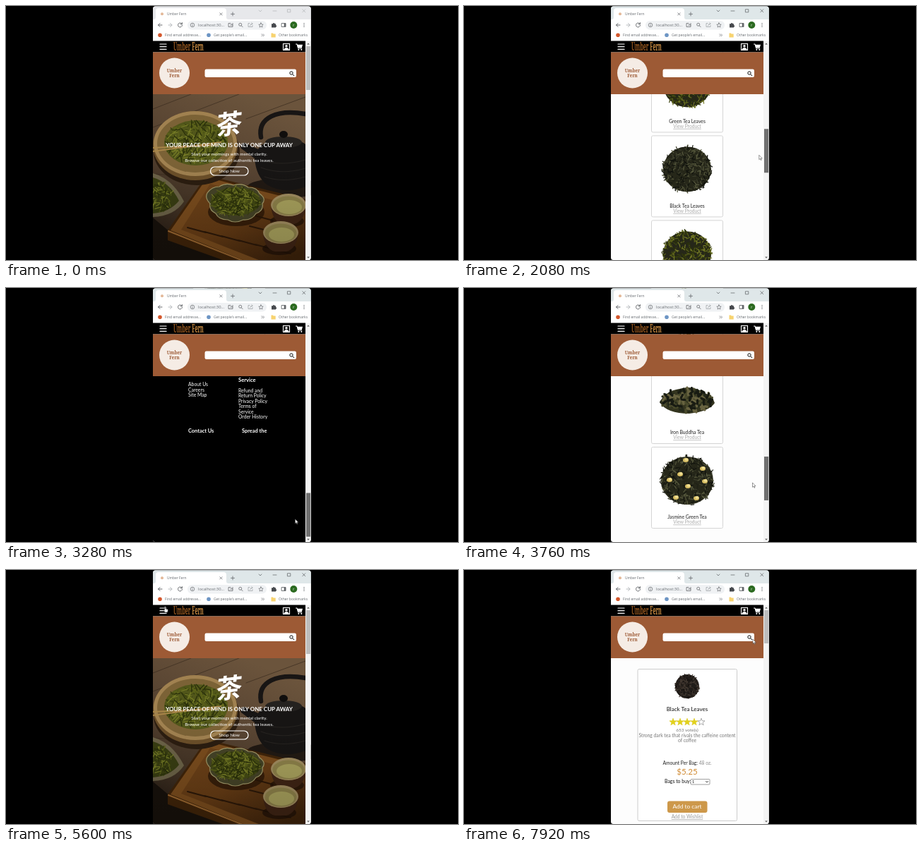
These frames come from a looping animation (640 px wide and 360 px high, 8000 ms). An HTML page:

```html
<!DOCTYPE html>
<html lang="en">
<head>
<meta charset="utf-8">
<title>Tea shop</title>
<style>
html, body { margin: 0; width: 100%; height: 100%; overflow: hidden; background: #000; }
svg { display: block; width: 100vw; height: 100vh; }
text { font-family: Lato, "Open Sans", sans-serif; }
.ui { font-family: "Open Sans", "Noto Sans", sans-serif; fill: #666b70; }
.serif { font-family: "Noto Serif", "Liberation Serif", serif; font-weight: 700; }
.cjk { font-family: "Noto Sans CJK SC", "Noto Sans CJK JP", "Noto Sans CJK", sans-serif; font-weight: 900; }
.line { fill: none; stroke-linecap: round; stroke-linejoin: round; }
</style>
</head>
<body>
<svg id="stage" viewBox="0 0 640 360" xmlns="http://www.w3.org/2000/svg"></svg>
<script>
const LOOP = 8000, STEP = 80;
const SHOP = ['Umber', 'Fern'];

let seed = 11;
const random = () => (seed = seed * 16807 % 2147483647) / 2147483647;

const rect = (x, y, w, h, fill, more = '') =>
  `<rect x="${x}" y="${y}" width="${w}" height="${h}" fill="${fill}" ${more}/>`;
const ellipse = (x, y, rx, ry, fill, more = '') =>
  `<ellipse cx="${x}" cy="${y}" rx="${rx}" ry="${ry}" fill="${fill}" ${more}/>`;
const shape = (d, fill, more = '') => `<path d="${d}" fill="${fill}" ${more}/>`;
const line = (d, color, width = 1, more = '') =>
  `<path class="line" d="${d}" stroke="${color}" stroke-width="${width}" ${more}/>`;
// y is the middle of the lower-case letters
const text = (x, y, size, fill, words, more = '') =>
  `<text x="${x}" y="${(y + size * .29).toFixed(2)}" font-size="${size}" fill="${fill}" ${more}>${words}</text>`;
const centred = (y, size, fill, words, more = '') =>
  text(316, y, size, fill, words, `text-anchor="middle" ${more}`);
const underlined = 'text-decoration="underline"';

// Loose tea: short strokes scattered inside an ellipse
function leaves(cx, cy, rx, ry, count, colors, length = 5, width = 1.2) {
  const paths = colors.map(() => '');
  for (let i = 0; i < count; i++) {
    const a = random() * 2 * Math.PI, r = Math.sqrt(random()), turn = random() * Math.PI;
    const x = cx + rx * r * Math.cos(a), y = cy + ry * r * Math.sin(a);
    const dx = Math.cos(turn) * length, dy = Math.sin(turn) * length;
    paths[i % colors.length] += `M${(x - dx / 2).toFixed(1)} ${(y - dy / 2).toFixed(1)}l${dx.toFixed(1)} ${dy.toFixed(1)}`;
  }
  return paths.map((d, i) => line(d, colors[i], width)).join('');
}

const greens = ['#3a410f', '#5c6319', '#757b26', '#2a300a'];

function cup(x, y) {
  return ellipse(x - 2, y + 20, 24, 9, '#1d0f06', 'opacity=".7"') +
    shape(`M${x - 25} ${y - 3}q2 24 17 27h16q15-4 17-27z`, '#3f2414') +
    ellipse(x, y - 3, 25, 16, '#a08c5f') + ellipse(x, y - 2, 22.5, 13.5, '#8c8049') +
    ellipse(x + 1, y, 18, 10, '#a7a05c');
}

function hero() {
  let slots = '';
  for (let i = 0; i < 6; i++) slots += `M${257 + i * 24} ${314 + i * 6}l26 7`;
  const planks = 'M208 146L262 125M208 172L330 125M340 160L424 129M208 238L240 240';
  return rect(208, 125, 216, 239, 'url(#wood)') + line(planks, '#3a2b1f', 1, 'opacity=".7"') +
    ellipse(395, 258, 55, 14, '#15100c', 'opacity=".8"') +
    // bamboo tray
    shape('M208 300L232 320L320 364H208Z', '#17110b') +
    shape('M284 240L424 274V364H318L229 332V318Z', '#402409') +
    shape('M285 243L424 278V364H346L233 318Z', '#7a4c1d') +
    shape('M289 252L424 287V364H368L248 317Z', 'url(#bamboo)') +
    line('M230 319L343 364', '#9b6730', 2) + line(slots, '#2c1808', 2) +
    line('M352 297l26 7M345 312l20 5', '#2c1808', 2) +
    // teapot
    line('M361 186C356 158 384 146 424 153', '#181514', 6.5) +
    shape('M352 216L333 202Q330 196 338 194L357 203Q366 189 394 188Q416 189 424 196V256Q394 268 369 253Q354 241 352 216Z', '#171514') +
    ellipse(393, 193, 26, 8, '#25221f') + ellipse(393, 182, 6, 5, '#100e0d') +
    line('M360 218Q390 228 424 218M361 229Q390 240 424 230M366 242Q392 251 424 242', '#262320', 1.2) +
    // bamboo bowl
    ellipse(270, 206, 61, 48, '#2b1d10') + ellipse(268, 198, 60, 49, '#6b4f29') +
    ellipse(268, 195, 59, 46, '#a08150') + ellipse(268, 195, 54, 41, '#7b6236') +
    ellipse(269, 194, 45, 32, '#51561a') + leaves(269, 194, 42, 29, 260, greens, 9, 1.3) +
    line('M208 206L304 193M208 201L300 197', '#a78548', 2.2) +
    // glass jar
    shape('M208 237Q236 245 252 277Q238 298 208 299Z', '#6b6247') +
    shape('M208 243Q232 250 245 276Q232 292 208 294Z', '#383d12') +
    leaves(219, 270, 16, 20, 80, greens, 8, 1.2) +
    // scalloped dish
    ellipse(326, 292, 40, 20, '#271506', 'opacity=".75"') +
    shape('M285 265q6-9 17-9q9-6 20-2q12-4 21 3q13 0 16 9q10 7 4 14q2 10-9 14q-6 10-18 9q-12 6-22 0q-13 0-17-9q-10-5-8-14q-8-8-4-15z', '#454327', 'stroke="#a09868" stroke-width="1.2"') +
    ellipse(325, 277, 35, 20, '#444a14') + leaves(325, 277, 34, 19, 220, greens, 9, 1.2) +
    cup(400, 285) + cup(389, 324) +
    rect(208, 125, 216, 239, 'url(#shade)') +
    `<g transform="translate(316 167) rotate(-7) skewX(-12)">${text(0, 3, 37, '#fff', '茶', 'class="cjk" text-anchor="middle"')}</g>` +
    centred(197.5, 8, '#fff', 'YOUR PEACE OF MIND IS ONLY ONE CUP AWAY', 'font-weight="700"') +
    centred(210, 6.25, '#fff', 'Start your mornings with mental clarity.') +
    centred(219.5, 6.3, '#fff', 'Browse our collection of authentic tea leaves.') +
    rect(289.5, 228, 53.5, 12, 'none', 'rx="6" stroke="#fff" stroke-width="1.2"') +
    centred(234, 6.5, '#fff', 'Shop Now');
}

const potIcon = line('M311 0q-3 3 0 5t0 5M317 0q-3 3 0 5t0 5M323 0q-3 3 0 5t0 5', '#000', 1.7) +
  line('M305 13h22v4h-22zM307 17q-5 6-4 11l2 6h22l2-6q1-5-4-11', '#000', 1.9) +
  line('M310 33v-4a6 6 0 0 1 12 0v4M316 26q-5 5 0 7q5-2 0-7', '#000', 1.5);
const cupIcon = line('M311 2v6M316 0v8M321 2v6', '#000', 1.6) +
  line('M304 11h24v6q0 10-8 10h-8q-8 0-8-10zM328 13h2q3 4-3 9M301 30h30', '#000', 1.8) +
  line('M317 11v5M314 18l3-2l3 2v5h-6z', '#000', 1.3);

function feature(y, icon, label, note) {
  return `<g transform="translate(0 ${y})">${icon}</g>` +
    centred(y + 39, 6.5, '#111', label) + centred(y + 46, 6.8, '#aaa', note);
}

const blossom = (x, y) => ellipse(x, y, 4, 3, '#d7bd63') + ellipse(x + 1, y - 1, 2.4, 2, '#eedd91');
const darkTea = ['#1f2016', '#3b3d2b', '#56583c', '#11130d'];
const roundTea = (y, rx, ry, colors = darkTea) =>
  ellipse(316, y, rx - 2, ry - 2, '#262719') + leaves(316, y, rx - 1, ry - 1, 330, colors, 4.5, 1.2);

function jasmine(y) {
  const spots = [[314, -29], [306, -9], [338, -17], [291, -1], [341, 1], [317, 8], [329, 25], [300, 24]];
  return roundTea(y, 39, 36) + spots.map(([x, dy]) => blossom(x, y + dy)).join('');
}
function ironBuddha(y) {
  return shape(`M277 ${y + 5}q8-16 28-19q18-6 34 5q14 5 16 15q-8 12-36 15q-32 0-42-16z`, '#34351f') +
    leaves(316, y + 2, 36, 16, 150, ['#24291a', '#494a2b', '#686340', '#181b12'], 5, 3.2);
}

function card(y, name, picture) {
  return rect(265.5, y + .5, 101, 115, '#fff', 'rx="2" stroke="#d5d5d5" stroke-width="1"') + picture +
    centred(y + 100.5, 6.8, '#222', name) + centred(y + 107.5, 6.7, '#aaa', 'View Product', underlined);
}

const column = (x, y, rows) =>
  rows.map((row, i) => text(x, y + i * 7.45, 6.8, '#fff', row)).join('');

function homePage() {
  const intro = ['All of our tea leaves are hand-picked in good shape, whole,',
    'and without any tear. We avoid the use of any industrial',
    'machines to pick the leaves in order to maintain excellent', 'quality.'];
  const bold = 'font-weight="700"';
  return hero() +
    centred(389.5, 10.3, '#111', 'Our meticulous standards go a long way') +
    intro.map((row, i) => centred(405 + i * 7.4, 6.85, '#888', row)).join('') +
    feature(450, potIcon, 'Aromatic', 'Experience fragrant smells') +
    feature(522, cupIcon, 'Great Taste', 'Experience fine flavors') +
    card(641, 'Green Tea Leaves', roundTea(689, 36, 34, greens)) +
    card(761, 'Black Tea Leaves', roundTea(809, 36, 34)) +
    card(881, 'Green Tea', roundTea(929, 36, 34, greens)) +
    card(1001, 'Iron Buddha Tea', ironBuddha(1053)) +
    card(1121, 'Jasmine Green Tea', jasmine(1169)) +
    rect(208, 1260, 216, 260, '#000') +
    text(258, 1272, 7.4, '#fff', 'Information', bold) +
    column(258, 1287.5, ['About Us', 'Careers', 'Site Map']) +
    text(329, 1272, 7.6, '#fff', 'Customer', bold) + text(329, 1281, 7.6, '#fff', 'Service', bold) +
    column(329, 1296, ['Refund and', 'Return Policy', 'Privacy Policy', 'Terms of', 'Service', 'Order History']) +
    text(258, 1352.5, 7.4, '#fff', 'Contact Us', bold) +
    text(334, 1352.5, 7.4, '#fff', 'Spread the', bold);
}

function star(x, filled) {
  let d = '';
  for (let i = 0; i < 10; i++) {
    const r = i % 2 ? 2.2 : 5.3, a = i * Math.PI / 5;
    d += `${i ? 'L' : 'M'}${(x + r * Math.sin(a)).toFixed(2)} ${(215.5 - r * Math.cos(a)).toFixed(2)}`;
  }
  return shape(d + 'Z', filled ? '#e3d21b' : '#fff', `stroke="${filled ? '#d8c716' : '#777'}" stroke-width=".6"`);
}

function productPage() {
  return rect(246, 140.5, 140.5, 215, '#fff', 'rx="2" stroke="#ccc"') +
    ellipse(316, 165, 17, 17, '#211d1a') + leaves(316, 165, 17, 17, 150, ['#17120f', '#302822', '#443a32'], 3, 1.2) +
    centred(198, 8.05, '#111', 'Black Tea Leaves') +
    [296, 306, 316, 326, 336].map(x => star(x, x < 330)).join('') +
    centred(227.5, 6.5, '#777', '653 vote(s)') +
    centred(235, 6.75, '#777', 'Strong dark tea that rivals the caffeine content') +
    centred(242, 6.75, '#777', 'of coffee') +
    centred(274, 6.7, '#222', 'Amount Per Bag: <tspan fill="#888">48 oz.</tspan>') +
    centred(287, 11.6, '#d08a32', '$5.25') +
    text(284, 300, 6.9, '#111', 'Bags to buy:') +
    rect(321, 296.5, 27, 7.5, '#fff', 'rx="1" stroke="#777" stroke-width=".7"') +
    text(323, 300.3, 5.5, '#111', '1') + line('M342.5 299.5l1.5 1.5l1.5-1.5', '#111', .8) +
    rect(288, 327.5, 56.5, 16.5, '#cd984a', 'rx="3"') +
    centred(336, 8.3, '#fff', 'Add to cart') +
    centred(350.3, 6.65, '#999', 'Add to Wishlist', underlined);
}

const magnifier = (x, y, r, color, width) =>
  `<circle cx="${x}" cy="${y}" r="${r}" fill="none" stroke="${color}" stroke-width="${width}"/>` +
  line(`M${x + r * .75} ${y + r * .75}l${r} ${r}`, color, width);

function browserBar() {
  const ink = '#66696d';
  return rect(208, 0, 224, 19, '#dfe6ea', 'id="titlebar"') +
    shape('M209 19q3 0 3-3V7q0-4 4-4h92q4 0 4 4v9q0 3 3 3z', '#fff') +
    ellipse(221, 11.3, 2, 2, '#e3b898') + text(228, 11.6, 4.9, '', SHOP.join(' '), 'class="ui"') +
    line('M302.8 9.8l3.2 3.2m0-3.2l-3.2 3.2M318.5 11.4h5m-2.5-2.5v5', ink, .8) +
    `<g id="controls">${line('M358 6l2 2l2-2M378 7h5M419.8 4.8l4 4m0-4l-4 4M398.8 4.8h4v4h-4z', 'currentColor', .7)}</g>` +
    rect(208, 19, 224, 31, '#fff') + rect(257, 21, 112, 12.5, '#f0f2f4', 'rx="6.2"') +
    line('M221 27h-5.5m2.5-2.5l-2.5 2.5l2.5 2.5', ink) +
    line('M230 27h5m-2.5-2.5l2.5 2.5l-2.5 2.5', '#b8bbbe') +
    line('M249 25.3a3 3 0 1 0 .5 2M249.4 23.6v2.2h-2.2', ink) +
    line('M264 26.7v1.8M264 25v.1', ink, .7) + `<circle cx="264" cy="27" r="2.8" fill="none" stroke="${ink}" stroke-width=".7"/>` +
    text(272, 27.2, 5.8, '', 'localhost:30...', 'class="ui"') +
    line('M318 24.5h-3v5h6v-2M317.5 27h3m-1.2-1.4l1.4 1.4M321 24.5v2', ink, .8) +
    magnifier(331.7, 26.3, 2, ink, .8) +
    line('M345 24.5h-2v5h6v-2M345.5 28q0-3 3.5-3m-1.3-1.3l1.5 1.3l-1.5 1.4', '#a3a7aa', .8) +
    line('M361 23.9l1 2.1l2.2.3l-1.7 1.5l.5 2.3l-2-1.2l-2 1.2l.5-2.3l-1.7-1.5l2.2-.3z', ink, .7) +
    shape('M376 25.2h2a1.2 1.2 0 0 1 2.4 0h1.6v2a1.2 1.2 0 0 1 0 2.4v.9h-6z', '#46494d') +
    line('M390.5 24.5h5.5v5h-5.5z', ink, .9) + rect(393.6, 24.5, 2.5, 5, ink) +
    ellipse(407.3, 27, 5, 5, '#2b6a20') + text(407.3, 27, 5.5, '#dfe8dc', 'r', 'text-anchor="middle"') +
    [24.7, 27, 29.3].map(y => ellipse(422, y, .7, .7, ink)).join('') +
    ellipse(218, 41.2, 2.8, 2.8, '#d4582d') + text(225, 41.3, 5.05, '', 'Find email addresse...', 'class="ui"') +
    ellipse(287, 41.2, 2.8, 2.8, '#6d95c4') + text(294, 41.3, 5.05, '', 'Get people’s email...', 'class="ui"') +
    line('M362 39.8l1.3 1.5l-1.3 1.5m2.2-3l1.3 1.5l-1.3 1.5', ink, .7) +
    shape('M375.5 38.4h2.4l.8 1h3v5.2h-6.2z', '#f7d36f') + text(386, 41.3, 5, '', 'Other bookmarks', 'class="ui"');
}

function siteHeader() {
  const badge = SHOP.map((word, i) => text(238.5, 92 + i * 7, 6.2, '#9d5a35', word, 'class="serif" text-anchor="middle"')).join('');
  return rect(208, 49.5, 216, 16, '#000') +
    line('M218 54h9M218 57.7h9M218 61.4h9', '#fff', 1.2) +
    `<text class="serif" font-size="16" transform="translate(237 63.4) scale(.44 1)"><tspan fill="#94561f">${SHOP[0]}</tspan> <tspan fill="#c78a41">${SHOP[1]}</tspan></text>` +
    rect(392.5, 53.5, 9, 9, 'none', 'stroke="#fff" stroke-width="1.1"') +
    ellipse(397, 56.8, 1.7, 1.8, '#fff') + shape('M393.5 62q.5-3 3.5-3t3.5 3z', '#fff') +
    line('M410.5 54h1.5l1.8 6h5', '#fff', 1.1) + shape('M412 54.8h8l-1.2 4.4h-5.6z', '#fff') +
    ellipse(414.3, 62, 1, 1, '#fff') + ellipse(418.3, 62, 1, 1, '#fff') +
    rect(208, 65.5, 216, 59.5, '#9d5a35') +
    ellipse(238.5, 95, 21.5, 21.5, '#f5ece5') + badge +
    rect(281.5, 89.5, 129.5, 11.5, '#fff', 'rx="2.2"') + magnifier(404, 95, 2.2, '#111', 1);
}

document.getElementById('stage').innerHTML = `
  <defs>
    <linearGradient id="wood" x1=".6" y1="0" x2=".2" y2="1">
      <stop offset="0" stop-color="#6b543c"/><stop offset=".45" stop-color="#544130"/>
      <stop offset=".75" stop-color="#3f3022"/><stop offset="1" stop-color="#1f1710"/>
    </linearGradient>
    <linearGradient id="bamboo" x1="0" y1="0" x2=".8" y2="1">
      <stop offset="0" stop-color="#6e4319"/><stop offset=".5" stop-color="#663c15"/><stop offset="1" stop-color="#3d220a"/>
    </linearGradient>
    <linearGradient id="shade" x1="0" y1="0" x2="0" y2="1">
      <stop offset=".4" stop-opacity="0"/><stop offset="1" stop-opacity=".2"/>
    </linearGradient>
    <clipPath id="view"><rect x="208" y=".5" width="223.7" height="359.5" rx="3.5"/></clipPath>
  </defs>
  ${rect(0, 0, 640, 360, '#000')}
  <g clip-path="url(#view)">
    ${rect(208, 0, 224, 360, '#fdfdfd')}
    <g id="home">${homePage()}</g>
    <g id="product">${productPage()}</g>
    ${browserBar()}${siteHeader()}
    ${rect(208, 65.5, 0, 294.5, '#000', 'id="panel" opacity=".8"')}
    ${rect(424, 50, 8, 310, '#f4f4f4')}
    ${shape('M426.2 54.6l1.8-2l1.8 2z', '#555')}${shape('M426.2 355.6l1.8 2l1.8-2z', '#555')}
    ${rect(425, 57, 6.2, 62, '#bdbdbd', 'id="thumb"')}
  </g>
  <g id="cursor">
    ${shape('M0 0V6.4L1.5 5L2.5 7.3L3.5 6.9L2.5 4.7H4.5Z', '#fff', 'id="arrow" stroke="#333" stroke-width=".5"')}
    ${shape('M0 0q1-1 1.4 0v3l2.8.7q.8.3.6 1.3l-.6 3h-3.4l-2.4-3q0-1 1.6 0z', '#fff', 'id="hand" stroke="#333" stroke-width=".5"')}
  </g>`;

// Piecewise linear value through [time, value] points
function track(points, t) {
  if (t <= points[0][0]) return points[0][1];
  for (let i = 1; i < points.length; i++) {
    const [t0, v0] = points[i - 1], [t1, v1] = points[i];
    if (t <= t1) return v0 + (v1 - v0) * (t - t0) / (t1 - t0);
  }
  return points[points.length - 1][1];
}

const scrollTrack = [[1040, 0], [1360, 108], [2720, 995], [3040, 1140], [3280, 1150], [3480, 1110],
  [3760, 896], [4560, 197], [4800, 30], [4880, 0]];
const cursorX = [[960, 424], [1360, 426], [2720, 410.5], [3760, 408.5], [4560, 404.5], [4880, 385],
  [5280, 252], [5600, 224.5], [5920, 224.5], [6000, 223.5], [6320, 223.5], [6720, 240], [7120, 262], [7920, 409]];
const cursorY = [[4880, 95], [5280, 66], [5600, 52], [5920, 52], [6000, 56], [6320, 57],
  [6720, 110], [7120, 150], [7920, 98]];
const panelTrack = [[6240, 0], [6640, 216]];

const part = id => document.getElementById(id);
const [home, product, panel, thumb, cursor, arrow, hand, controls, titlebar] =
  ['home', 'product', 'panel', 'thumb', 'cursor', 'arrow', 'hand', 'controls', 'titlebar'].map(part);
const show = (node, on) => node.setAttribute('visibility', on ? 'visible' : 'hidden');

function draw(t) {
  const scroll = track(scrollTrack, t);
  const thumbTop = 57 + scroll / 4.925;
  const focused = t >= 960;
  const dragging = t >= 1040 && t < 4880;
  const onProduct = t >= 7200;
  const pointing = t >= 5440 && t < 6400;

  home.setAttribute('transform', `translate(0 ${-scroll})`);
  show(home, !onProduct);
  show(product, onProduct);
  panel.setAttribute('width', onProduct ? 0 : track(panelTrack, t));
  thumb.setAttribute('y', thumbTop);
  thumb.setAttribute('height', onProduct ? 47 : 62);
  thumb.setAttribute('fill', dragging ? '#707070' : '#bdbdbd');
  controls.setAttribute('color', focused ? '#5a5e61' : '#b0b3b6');
  titlebar.setAttribute('fill', focused ? '#dfe7e9' : '#e7e8eb');

  const y = t < 4880 ? thumbTop + 37 : track(cursorY, t);
  cursor.setAttribute('transform', `translate(${track(cursorX, t)} ${y})`);
  show(arrow, focused && !pointing);
  show(hand, pointing);
}

const start = performance.now();
function tick() {
  const t = (performance.now() - start) % LOOP;
  draw(Math.floor(t / STEP) * STEP);
  requestAnimationFrame(tick);
}
tick();
</script>
</body>
</html>
```
